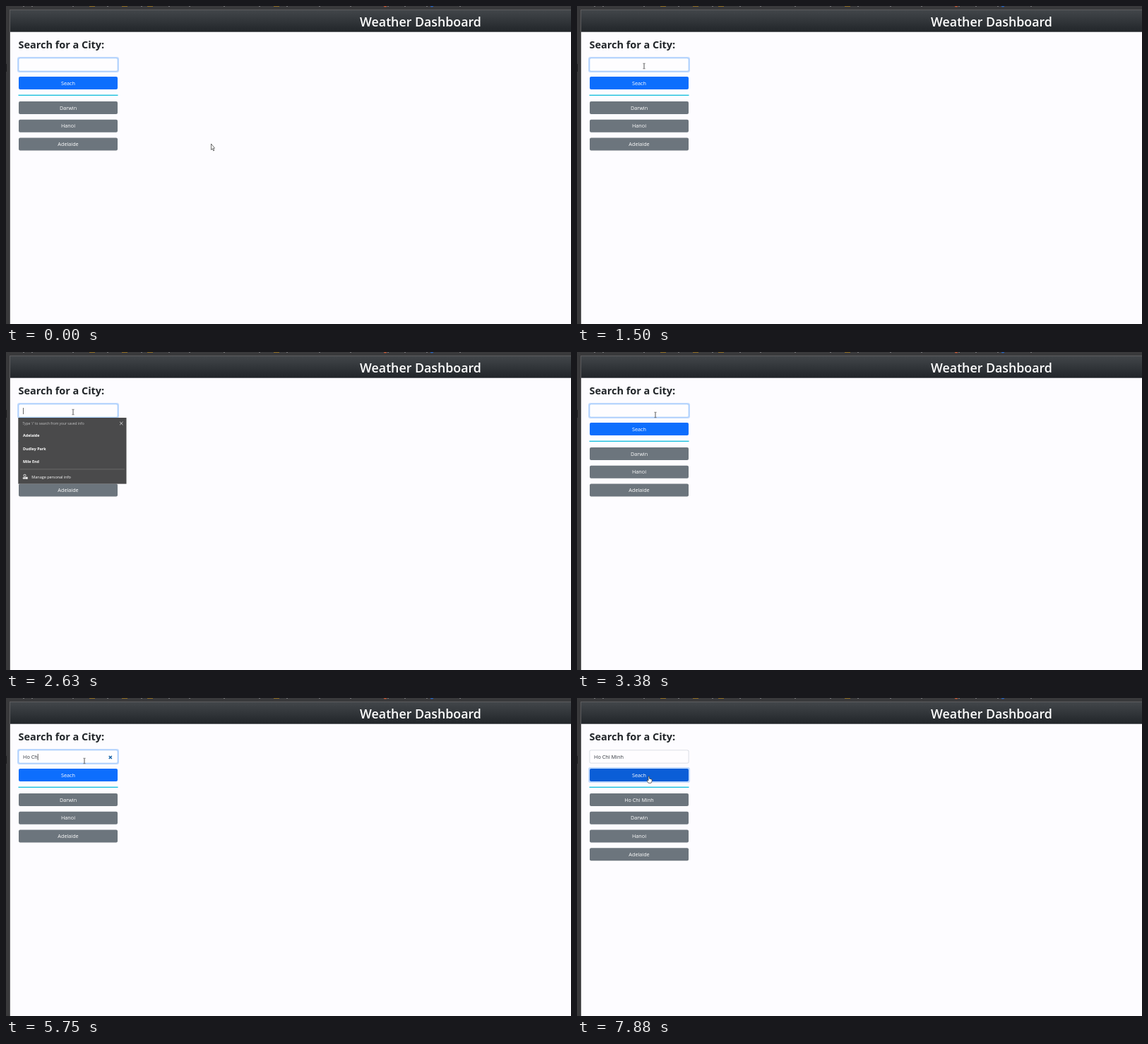
An HTML page with a canvas for the animation above (8000 ms loop, 800x450 px).

```html
<!DOCTYPE html>
<html lang="en">
<head>
<meta charset="utf-8">
<title>Weather Dashboard</title>
<style>
  html, body { margin: 0; width: 100%; height: 100%; overflow: hidden; background: #fdfcff; }
  canvas { display: block; width: 800px; height: 450px; }
</style>
</head>
<body>
<canvas id="stage" width="800" height="450"></canvas>
<script>
const ctx = document.getElementById('stage').getContext('2d');
const LOOP = 8000, STEP = 125;
const FONT = '"Open Sans", "Noto Sans", sans-serif';
const LEFT = 18, WIDTH = 140, ROW = 18, MIDDLE = LEFT + WIDTH / 2;
const INPUT_Y = 74, BUTTON_Y = 100, LIST_Y = 135, LIST_PITCH = 25.75;
const POPUP_OPEN = 1625, POPUP_CLOSE = 2750, PRESS = 7625, RESULT = 7750;
const BLINK = 525;

const START = { x: 290.5, y: 195 };
const GLIDES = [
  { from: 0, to: 750, x: 164, y: 195 },
  { from: 1000, to: 1375, x: 95, y: 85 },
  { from: 2625, to: 3000, x: 192, y: 92 },
  { from: 3000, to: 3375, x: 111, y: 89 },
  { from: 7250, to: PRESS, x: 101, y: 111 }
];

// Each burst spreads its letters evenly between two times
const BURSTS = [
  { text: 'Ho ', from: 4625, to: 5125 },
  { text: 'Ch', from: 5375, to: 5750 },
  { text: 'i ', from: 5875, to: 6000 },
  { text: 'Minh', from: 6375, to: 6750 }
];

const clamp = v => Math.min(1, Math.max(0, v));
const smooth = p => p * p * (3 - 2 * p);

function pointerAt(t) {
  return GLIDES.reduce((at, { from, to, x, y }) => {
    const p = smooth(clamp((t - from) / (to - from)));
    return { x: at.x + (x - at.x) * p, y: at.y + (y - at.y) * p };
  }, START);
}

function typedAt(t) {
  return BURSTS.map(({ text, from, to }) => {
    const pace = (to - from) / (text.length - 1);
    return text.slice(0, Math.max(0, Math.floor((t - from) / pace) + 1));
  }).join('');
}

function caretAt(t) {
  if (t >= BURSTS[0].from) return t < 7375;
  return t >= POPUP_OPEN && Math.floor(t / BLINK) % 2 === 1;
}

function rect(x, y, w, h, fill) {
  ctx.fillStyle = fill;
  ctx.fillRect(x, y, w, h);
}

function rounded(x, y, w, h, r, fill) {
  ctx.beginPath();
  ctx.roundRect(x, y, w, h, r);
  ctx.fillStyle = fill;
  ctx.fill();
}

function dot(x, y, r, color) {
  rounded(x - r, y - r, 2 * r, 2 * r, r, color);
}

function text(str, x, y, size, color, weight = 400, align = 'left') {
  ctx.font = `${weight} ${size}px ${FONT}`;
  ctx.textAlign = align;
  ctx.fillStyle = color;
  ctx.fillText(str, x, y);
}

function line(x0, y0, x1, y1, color, width) {
  ctx.beginPath();
  ctx.moveTo(x0, y0);
  ctx.lineTo(x1, y1);
  ctx.strokeStyle = color;
  ctx.lineWidth = width;
  ctx.stroke();
}

function cross(x, y, r, color, width) {
  line(x - r, y - r, x + r, y + r, color, width);
  line(x + r, y - r, x - r, y + r, color, width);
}

// Bookmark row cut off by the top edge
function drawBookmarks() {
  let seed = 7;
  const random = () => (seed = seed * 16807 % 2147483647) / 2147483647;
  for (let x = 24; x < 680; x += 12 + random() * 50) rect(Math.round(x), 0, 2, 1, '#77777a');
  for (const x of [118, 164, 200, 379]) rect(x, 0, 8, 1, '#8f6d24');
  dot(537, -1, 2.5, '#c05a3a');
  dot(603, -1, 2.5, '#2a62b8');
}

function drawFrame() {
  rect(0, 0, 800, 450, '#39393b');
  drawBookmarks();
  rect(5, 5, 795, 445, '#5c5c5e');
  rect(6, 6, 794, 444, '#fdfcff');
  rect(0, 82, 1, 11, '#1c1c1e');

  const shade = ctx.createLinearGradient(0, 6, 0, 37);
  shade.addColorStop(0, '#42464a');
  shade.addColorStop(1, '#212529');
  rect(6, 6, 794, 30.7, shade);
  text('Weather Dashboard', 587, 29, 17.8, '#fff', 600, 'center');
  text('Search for a City:', LEFT - .5, 60, 14.45, '#212529', 700);
}

function focusRing(y) {
  rounded(LEFT - 2, y - 2, WIDTH + 4, ROW + 4, 3, '#c2dbfe');
}

function button(label, y, fill) {
  rounded(LEFT, y, WIDTH, ROW, 2, fill);
  text(label, MIDDLE, y + 11.7, 7.25, '#fff', 500, 'center');
}

function drawInput(value, focused, caret) {
  if (focused) focusRing(INPUT_Y);
  rounded(LEFT - .5, INPUT_Y - .5, WIDTH + 1, ROW + 1, 2, focused ? '#9cc6fb' : '#d3d8de');
  rounded(LEFT + .3, INPUT_Y + .3, WIDTH - .6, ROW - .6, 1.5, '#fefdff');
  text(value, 24, 86, 7.3, '#343a40');
  if (caret) rect(24 + ctx.measureText(value).width, 79, .8, 9, '#444');
  if (focused && value) cross(147.8, 84, 2, '#0b5fa5', 1.4);
}

function drawPopup() {
  rect(17.3, 93, 153.2, 93.6, '#4a4a4b');
  text("Type '/' to search from your saved info", 23.5, 103, 4.92, '#c4c4c4');
  cross(163.3, 101, 2.2, '#e6e6e6', .8);
  ['Adelaide', 'Dudley Park', 'Mile End'].forEach((name, i) =>
    text(name, 24, 120.3 + i * 18.2, 5.4, '#fff', 700));
  rect(20, 165.5, 148, .8, '#707071');
  dot(26.5, 174.8, 2, '#eee');
  dot(26.5, 174.8, 1.2, '#4a4a4b');
  rounded(23.7, 177.2, 4, 2.6, 1.2, '#ddd');
  rect(27.5, 176.8, 3.2, 3, '#eee');
  text('Manage personal info', 36.3, 178.6, 5.47, '#fff');
}

function outline(x, y, path) {
  const shape = new Path2D(path);
  ctx.save();
  ctx.translate(x, y);
  ctx.fillStyle = '#fff';
  ctx.fill(shape);
  ctx.strokeStyle = '#333';
  ctx.lineWidth = .7;
  ctx.stroke(shape);
  ctx.restore();
}

function drawPointer({ x, y }, overInput, overButton) {
  if (overInput) {
    line(x, y - 3.5, x, y + 3.5, '#444', .9);
    for (const end of [-3.7, 3.7]) line(x - 1.6, y + end, x + 1.6, y + end, '#666', .8);
  } else if (overButton) {
    outline(x, y, 'M0 0h1.4l.2 3.2 3.4.8.2 2.5-1.2 2.8H.2L-2 6l.5-1L0 6z');
  } else {
    outline(x, y, 'M0 0v8.5l1.8-1.6 1.3 3 1.2-.6L3 6.5 5 6.2z');
  }
}

function draw(time) {
  const t = Math.floor(time / STEP) * STEP;
  const pointer = pointerAt(t);
  const over = top => pointer.x > LEFT && pointer.x < LEFT + WIDTH &&
    pointer.y > top && pointer.y < top + ROW;
  const overInput = over(INPUT_Y), overButton = over(BUTTON_Y);
  const pressed = t >= PRESS;

  drawFrame();
  drawInput(typedAt(t), !pressed, caretAt(t));
  if (pressed) focusRing(BUTTON_Y);
  button('Seach', BUTTON_Y, overButton ? '#0b5ed7' : '#0d6efd');
  rect(LEFT - .5, 125.6, WIDTH + 1, 1.4, '#1cc0de');

  const cities = ['Darwin', 'Hanoi', 'Adelaide'];
  if (t >= RESULT) cities.unshift('Ho Chi Minh');
  cities.forEach((city, i) => button(city, LIST_Y + i * LIST_PITCH, '#6c757d'));

  if (t >= POPUP_OPEN && t < POPUP_CLOSE) drawPopup();
  drawPointer(pointer, overInput, overButton);
}

function tick() {
  draw(performance.now() % LOOP);
  requestAnimationFrame(tick);
}
tick();
</script>
</body>
</html>
```
